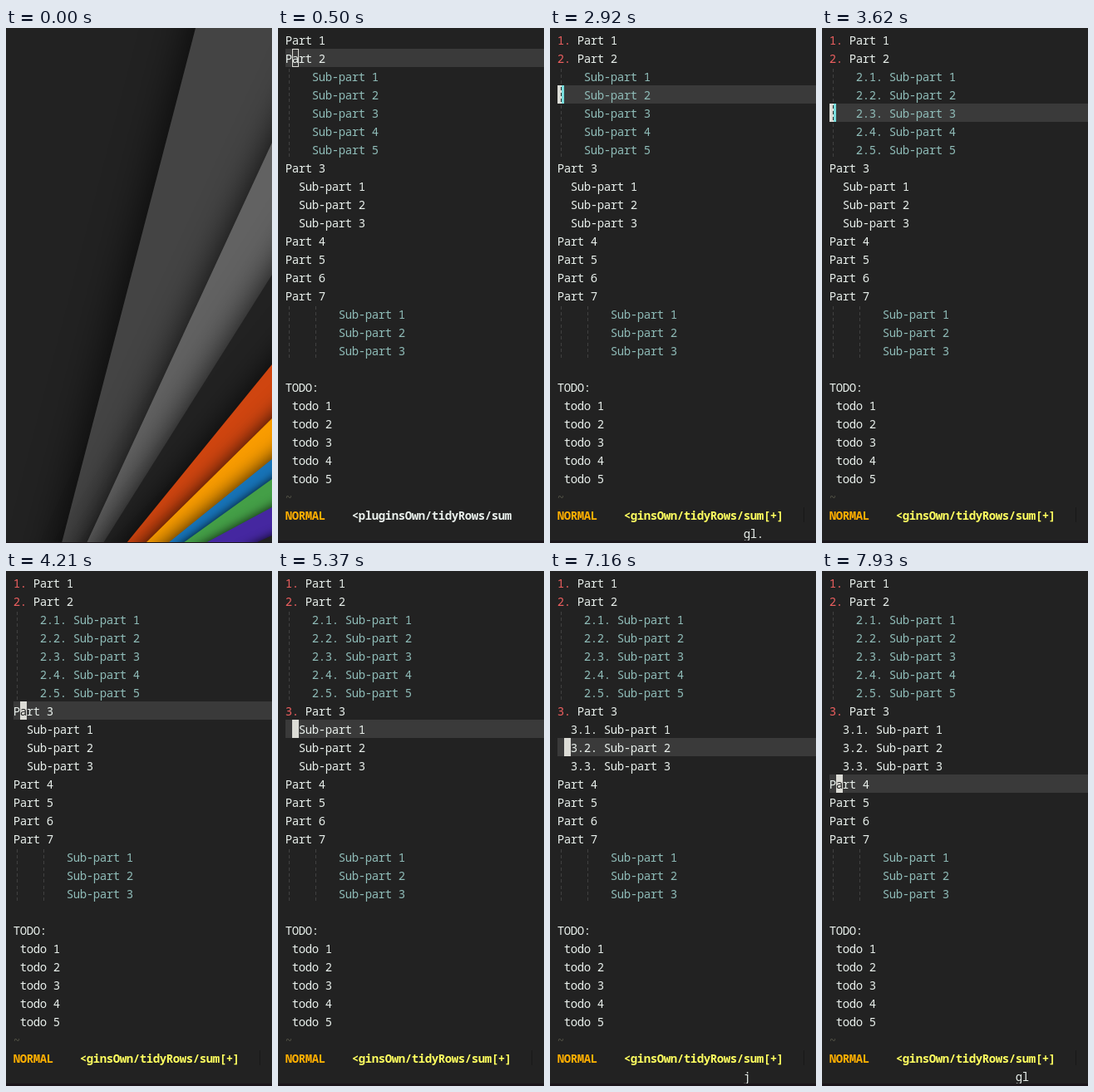
Recreate the animation shown at these times as an HTML page with a canvas. Size 320 by 620 pixels, loop 8000 ms.

```html
<!DOCTYPE html>
<html lang="en">
<head>
<meta charset="utf-8">
<title>List numbering</title>
<style>
html, body { margin: 0; width: 320px; height: 620px; overflow: hidden; background: #222; }
canvas { display: block; }
</style>
</head>
<body>
<canvas id="stage" width="320" height="620"></canvas>
<script>
const ctx = document.getElementById('stage').getContext('2d');
const LOOP = 8000, LEFT = 9, TOP = 3, CELL = 8, LINE = 22;
const BG = '#222222', WHITE = '#e9f0ec', TEAL = '#8fbcb8', RED = '#ec5f5f', CURSOR = '#dcdcd6';

// Time each value takes effect, followed by the value.
const cursorRows = [[500, 1], [2030, 2], [2170, 3], [3620, 4], [4110, 5], [4160, 6], [4210, 7],
  [5370, 8], [7000, 9], [7180, 10], [7340, 11]];
const pending = [[0, ''],
  [1380, 'g'], [1570, 'gl'], [1730, ''], [1980, 'j'], [2030, ''],
  [2430, 'g'], [2580, 'gl'], [2920, 'gl.'], [3330, ''], [3570, 'j'], [3620, ''],
  [4060, 'j'], [4110, ''], [4450, 'g'], [4560, 'gl'], [5020, ''], [5320, 'j'], [5370, ''],
  [5650, 'g'], [5780, 'gl'], [6280, 'gl.'], [6660, ''], [6950, 'j'], [7000, ''],
  [7130, 'j'], [7180, ''], [7290, 'j'], [7340, ''], [7820, 'g'], [7930, 'gl']];
const FOCUS = 650, PARTS = 1770, SUBS = 3380, PART3 = 5070, SUBS3 = 6710;

function valueAt(steps, t) {
  let value = steps[0][1];
  for (const [start, next] of steps) if (t >= start) value = next;
  return value;
}

function box(x, y, w, h, color) {
  ctx.fillStyle = color;
  ctx.fillRect(x, y, w, h);
}

const colX = col => LEFT + col * CELL;
const rowY = row => TOP + row * LINE;

function type(str, col, row, color, weight = 400) {
  ctx.font = `${weight} 14px "Noto Sans Mono", monospace`;
  ctx.textAlign = 'center';
  ctx.fillStyle = color;
  [...str].forEach((ch, i) => ctx.fillText(ch, colX(col + i) + CELL / 2, rowY(row) + 17));
}

// Everything to the right of an edge is one sheet that shades the sheet on its left.
function sheet([x, y, bottomX, color, blur]) {
  const dx = x - bottomX, dy = y - 620;
  ctx.fillStyle = color;
  ctx.shadowColor = 'rgba(0,0,0,0.85)';
  ctx.shadowBlur = blur;
  ctx.beginPath();
  ctx.moveTo(x + dx, y + dy);
  ctx.lineTo(bottomX - dx, 620 - dy);
  ctx.lineTo(1500, 620 - dy);
  ctx.lineTo(1500, y + dy);
  ctx.fill();
}

function drawWallpaper() {
  ctx.save();
  [[228, 0, 67, '#444444', 54],
   [320, 138, 97, '#626262', 42],
   [320, 297, 117, '#222222', 40],
   [320, 405, 145, '#cf4510', 36],
   [320, 470, 168, '#f99c00', 24],
   [320, 519, 195, '#1773b7', 24],
   [320, 543, 213, '#449f47', 12],
   [320, 577, 240, '#4527a0', 14],
   [320, 611, 300, '#222222', 12]].forEach(sheet);
  ctx.restore();
}

function guide(col, row, color) {
  const x = colX(col) + 4, y = rowY(row);
  box(x, y + 2, 1, 4, color);
  box(x, y + 9, 1, 4, color);
  box(x, y + 16, 1, 4, color);
}

function buildLines(t) {
  const lines = [];
  const add = (row, col, text, color, weight) => lines.push({ row, col, text, color, weight });
  const part = (n, row, numbered) => {
    if (numbered) add(row, 0, n + '.', RED, 500);
    add(row, numbered ? 3 : 0, 'Part ' + n, WHITE);
  };
  const subs = (count, row, col, prefix, color, weight) => {
    for (let n = 1; n <= count; n++) {
      const label = prefix ? `${prefix}.${n}. ` : '';
      add(row + n - 1, col, `${label}Sub-part ${n}`, color, weight);
    }
  };
  part(1, 0, t >= PARTS);
  part(2, 1, t >= PARTS);
  subs(5, 2, 4, t >= SUBS ? 2 : 0, TEAL, 300);
  part(3, 7, t >= PART3);
  subs(3, 8, 2, t >= SUBS3 ? 3 : 0, WHITE);
  for (let n = 4; n <= 7; n++) part(n, 7 + n, false);
  subs(3, 15, 8, 0, TEAL, 300);
  add(19, 0, 'TODO:', WHITE);
  for (let n = 1; n <= 5; n++) add(19 + n, 1, 'todo ' + n, WHITE);
  add(25, 0, '~', '#555548');
  return lines;
}

function drawCursor(row, t, lines) {
  const onTab = row >= 2 && row <= 6;
  const col = onTab ? 0 : 1;
  const x = colX(col), y = rowY(row);
  if (t < FOCUS) {
    ctx.strokeStyle = CURSOR;
    ctx.lineWidth = 1;
    ctx.strokeRect(x + 0.5, y + 0.5, CELL - 1, LINE - 1);
    return;
  }
  box(x, y, CELL, LINE, CURSOR);
  if (onTab) {
    box(x + 5, y, 3, LINE, '#78dcdc');
    guide(col, row, BG);
    return;
  }
  const under = lines.find(l => l.row === row && col >= l.col && col < l.col + l.text.length);
  if (under) type(under.text[col - under.col], col, row, BG, under.weight);
}

function drawEditor(t) {
  const row = valueAt(cursorRows, t);
  const lines = buildLines(t);
  box(LEFT, rowY(row), 320 - LEFT, LINE, '#3a3a3a');
  for (let r = 2; r <= 6; r++) guide(0, r, '#404040');
  for (let r = 15; r <= 17; r++) {
    guide(0, r, '#404040');
    guide(4, r, '#404040');
  }
  for (const l of lines) type(l.text, l.col, l.row, l.color, l.weight);
  drawCursor(row, t, lines);

  const changed = t >= PARTS;
  type('NORMAL', 0, 26, '#ffaf00', 700);
  type(changed ? '<ginsOwn/tidyRows/sum[+]' : '<pluginsOwn/tidyRows/sum', 10, 26,
    changed ? '#ffff5f' : WHITE, 700);
  if (t >= 2030) box(305, rowY(26) + 2, 1, 18, '#181818');
  type(valueAt(pending, t), 28, 27, WHITE);
}

function draw(now) {
  const t = now % LOOP;
  box(0, 0, 320, 620, BG);
  if (t < 500) drawWallpaper();
  else drawEditor(t);
  box(0, t < 500 ? 619 : 617, 320, 3, '#1c161b');
}

const start = performance.now();
function tick() {
  draw(performance.now() - start);
  requestAnimationFrame(tick);
}
tick();
</script>
</body>
</html>
```
